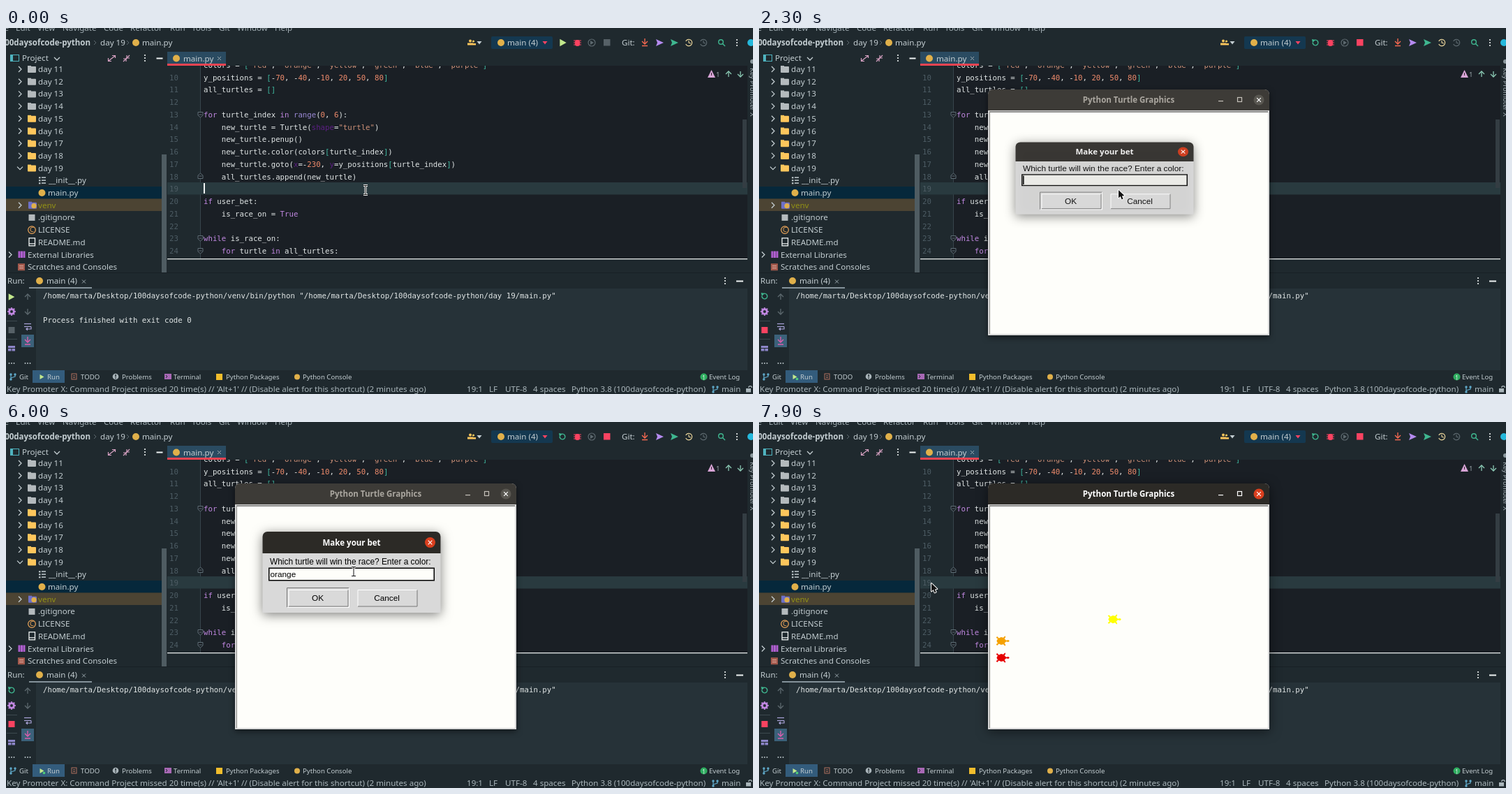
An HTML page with a canvas for the animation above (8 s loop, 1070 by 524 pixels).

```html
<!DOCTYPE html>
<html lang="en">
<head>
<meta charset="utf-8">
<title>Turtle race</title>
<style>
html, body { margin: 0; width: 100%; height: 100%; overflow: hidden; background: #1f292e; }
canvas { display: block; }
</style>
</head>
<body>
<canvas id="stage" width="1070" height="524"></canvas>
<script>
const ctx = document.getElementById('stage').getContext('2d');
const LOOP = 8000, STEP = 100;
const UI = '11.6px "Noto Sans", sans-serif', SMALL = '9.6px "Noto Sans", sans-serif';
const BOLD = 'bold 11.5px "Noto Sans", sans-serif', TK = '11.8px "Liberation Sans", sans-serif';
const MONO = '10.71px "DejaVu Sans Mono", monospace';
const FG = '#c3cdd1', WHITE = '#eef2f2', GREY = '#5d696f', YELLOW = '#fdc65c', TEAL = '#3fb68f',
  RED = '#fa4361', PURPLE = '#c087e0', PANEL = '#1f292e', PYTHON = '#e0b04a';

// Drawing helpers
function text(s, x, y, color = FG, font = UI, align = 'left') {
  ctx.font = font; ctx.fillStyle = color; ctx.textAlign = align;
  ctx.fillText(s, x, y + (font === SMALL ? 3.5 : 4));
}
function rect(x, y, w, h, color) { ctx.fillStyle = color; ctx.fillRect(x, y, w, h); }
function box(x, y, w, h, color, lw = 1) { ctx.strokeStyle = color; ctx.lineWidth = lw; ctx.strokeRect(x, y, w, h); }
function trace(p) {
  ctx.beginPath();
  for (let i = 0; i < p.length; i += 2) ctx.lineTo(p[i], p[i + 1]);
}
function line(color, lw, ...p) { trace(p); ctx.strokeStyle = color; ctx.lineWidth = lw; ctx.stroke(); }
function poly(color, ...p) { trace(p); ctx.fillStyle = color; ctx.fill(); }
function dot(x, y, r, color) { ctx.beginPath(); ctx.arc(x, y, r, 0, 7); ctx.fillStyle = color; ctx.fill(); }
function ring(x, y, r, color, lw = 1.2, from = 0, to = 2 * Math.PI) {
  ctx.beginPath(); ctx.arc(x, y, r, from, to); ctx.strokeStyle = color; ctx.lineWidth = lw; ctx.stroke();
}
function rounded(x, y, w, h, r, color) { ctx.beginPath(); ctx.roundRect(x, y, w, h, r); ctx.fillStyle = color; ctx.fill(); }
function layer(draw) { ctx.save(); draw(); ctx.restore(); }

// Icons
const python = (x, y) => dot(x, y, 5, PYTHON);
const play = (x, y, s = 4.7) => poly('#c3e88d', x - s, y - s - .5, x + s, y, x - s, y + s + .5);
const cross = (x, y, s, color, lw = 1) => { line(color, lw, x - s, y - s, x + s, y + s); line(color, lw, x - s, y + s, x + s, y - s); };
const chevron = (x, y, down) => down
  ? line(FG, 1.3, x - 4, y - 2, x, y + 2, x + 4, y - 2) : line(FG, 1.3, x - 2, y - 4, x + 2, y, x - 2, y + 4);
const kebab = (x, y) => [-4, 0, 4].forEach(d => dot(x, y + d, 1.1, WHITE));
const dots = (x, y) => [-3.5, 0, 3.5].forEach(d => dot(x + d, y, .9, FG));
const triangle = (x, y, color) => poly(color, x - 3.5, y - 2, x + 3.5, y - 2, x, y + 2.5);
function folder(x, y, color) { rect(x, y - 5, 5, 3, color); rounded(x, y - 4, 12, 9, 1, color); }
function rerun(x, y) { ring(x, y, 3.8, TEAL, 1.5, -1.9, 3.2); poly(TEAL, x - 5, y - 5, x, y - 4, x - 4, y); }
function arrow(x, y, dir, color) {
  line(color, 1.3, x, y + 4, x, y - 4);
  line(color, 1.3, x - 4, y, x, y + 4 * dir, x + 4, y);
}
function branch(x, y, color) {
  line(color, 1.2, x - 3, y - 3, x - 3, y + 4);
  line(color, 1.2, x + 3, y - 2, x + 3, y, x - 3, y + 2);
  dot(x - 3, y - 3, 1.7, color); dot(x + 3, y - 3, 1.7, color); dot(x - 3, y + 4, 1.7, color);
}
function clock(x, y, color) { ring(x, y, 4.7, color, 1.2, -2.7, 2.7); line(color, 1.1, x, y - 3, x, y, x + 3, y + 1); }
const sendArrow = (x, y, color) => poly(color, x - 5, y - 5, x + 6, y, x - 5, y + 5, x - 3, y);

function topBars(running) {
  const menu = { Edit: 14, View: 45, Navigate: 81, Code: 140, Refactor: 178, Run: 235, Tools: 266, Git: 305, Window: 331, Help: 385 };
  text('File', 4, 0, '#a3afb5', UI, 'right');
  for (const name in menu) text(name, menu[name], 0, '#a3afb5');
  text('100daysofcode-python', 121, 21, FG, BOLD, 'right');
  line(GREY, 1, 126, 18, 129, 21, 126, 24);
  text('day 19', 135, 21);
  line(GREY, 1, 173, 18, 176, 21, 173, 24);
  python(186, 21); text('main.py', 195, 21);

  dot(665, 18.5, 2, YELLOW); rect(661, 21.5, 8, 3, YELLOW); dot(669.5, 19, 1.6, YELLOW); rect(669, 22, 4, 2.5, YELLOW);
  triangle(678, 21, FG);
  rounded(695, 12, 88, 18, 2, '#143850');
  python(709, 21); text('main (4)', 718, 21); triangle(772, 21, RED);
  running ? rerun(797, 21) : play(798, 21);
  rounded(815, 17, 7, 9, 3, RED);
  [18, 21, 24].forEach(y => line(RED, 1, 813, y, 824, y));
  ring(839, 21, 5, GREY); poly(GREY, 837, 18, 842, 21, 837, 24);
  rect(856, 16, 9.5, 9.5, running ? RED : '#566167');
  text('Git:', 882, 21);
  arrow(915, 19, 1, '#ff6b52'); line('#ff6b52', 1.4, 911, 25.5, 919, 25.5);
  sendArrow(936, 21, '#b58af0'); sendArrow(957, 21, TEAL);
  clock(978, 21, '#e8d39a'); clock(999, 21, GREY);
  ring(1024, 20, 3.3, TEAL, 1.4); line(TEAL, 1.5, 1026, 22, 1030, 26);
  kebab(1047, 21); dot(1067, 21, 5, '#25b8dc');
}

function projectTree() {
  box(6.5, 38.5, 12, 9, '#4fb3bf'); rect(6, 38, 4, 10, '#4fb3bf');
  text('Project', 23, 43); chevron(73, 44, true);
  const pink = '#d9a3c4';
  line(pink, 1.2, 147, 47, 156, 40); line(pink, 1.2, 152, 39.5, 156.5, 39.5, 156.5, 43); line(pink, 1.2, 146.5, 43, 146.5, 47.5, 151, 47.5);
  line(pink, 1.2, 168, 48, 177, 39); line(pink, 1.2, 173, 39, 173, 43, 177, 43); line(pink, 1.2, 168, 44, 172, 44, 172, 48);
  kebab(199, 43); rect(215.5, 42.5, 9, 2, WHITE);

  const row = i => 59 + 17.7 * i;
  layer(() => {
    ctx.beginPath(); ctx.rect(0, 54, 231, 296); ctx.clip();
    rect(0, 227, 230, 17.5, '#06283b'); rect(0, 244.5, 230, 17.5, '#4c4433');
    for (let i = 0; i < 9; i++) {
      chevron(20, row(i), i === 8); folder(31, row(i), i < 4 ? '#b4babd' : YELLOW);
      text('day ' + (11 + i), 46, row(i));
    }
    [-4, 0, 4].forEach(d => { rect(47, row(9) + d - 1, 2.5, 2, FG); rect(51, row(9) + d - 1, 6, 1.5, FG); });
    text('__init__.py', 61, row(9));
    python(51.5, row(10)); text('main.py', 60, row(10));
    chevron(20, row(11)); folder(32, row(11), '#6d70c8'); dot(40, row(11) + 1, 3.6, PYTHON);
    text('venv', 46, row(11), '#929116');
    rect(32.5, row(12) - 4.5, 9, 9, '#b4babd'); text('.gitignore', 46, row(12));
    ring(37, row(13), 5.3, '#f0a85a'); text('C', 37, row(13) - .3, '#f0a85a', SMALL, 'center'); text('LICENSE', 46, row(13));
    box(33, row(14) - 6, 8.5, 11, WHITE, 1.3); line(WHITE, 1.2, 33, row(14) + 2, 41, row(14) + 2); text('README.md', 46, row(14));
    chevron(6, row(15));
    [17.5, 21, 24.5].forEach(x => rect(x, row(15) - 5, 3, 9.5, '#b05fd0'));
    text('External Libraries', 31, row(15));
    rect(17, row(16) - 5, 10, 10, '#a3594c'); [-2, 1].forEach(d => rect(19, row(16) + d, 6, 1, '#e3b5a8'));
    text('Scratches and Consoles', 31, row(16));
  });
  rect(223, 181, 7, 169, '#4f5c62');
}

const code = [
  'colors = ["red", "orange", "yellow", "green", "blue", "purple"]',
  'y_positions = [-70, -40, -10, 20, 50, 80]',
  'all_turtles = []',
  '',
  'for turtle_index in range(0, 6):',
  '    new_turtle = Turtle(shape="turtle")',
  '    new_turtle.penup()',
  '    new_turtle.color(colors[turtle_index])',
  '    new_turtle.goto(x=-230, y=y_positions[turtle_index])',
  '    all_turtles.append(new_turtle)',
  '',
  'if user_bet:',
  '    is_race_on = True',
  '',
  'while is_race_on:',
  '    for turtle in all_turtles:'
];
function tokenColor(token, next) {
  if (token[0] === '"') return '#ce9178';
  if (/^(for|in|if|while|True)$/.test(token)) return PURPLE;
  if (/^\d/.test(token)) return '#f08c6c';
  if (token === 'range') return '#9c8ad6';
  if (/[\[\]]/.test(token)) return '#3fb8a0';
  return /^\w/.test(token) && next === '=' ? '#5c1f85' : '#e1e6e6';
}
function editor(caret) {
  rect(231, 34, 84, 20, '#2a4b61'); rect(231, 51, 84, 3, '#ee4452');
  python(244, 43.5); text('main.py', 254, 43.5); cross(305.5, 43.5, 2.5, '#9aa7ad');
  rect(278, 54, 784, 276, '#1a1f25');
  rect(278, 54, 1, 276, '#38454c');
  rect(231, 221, 831, 17.5, '#293a3f');
  layer(() => {
    ctx.beginPath(); ctx.rect(231, 54, 831, 276); ctx.clip();
    code.forEach((source, i) => {
      const y = 52.8 + 17.75 * i;
      if (i) text(9 + i, 247, y, '#4d5c64', MONO, 'right');
      for (const m of source.matchAll(/"[^"]*"|\w+|\S/g))
        text(m[0], 283 + m.index * 6.447, y, tokenColor(m[0], source[m.index + m[0].length]), MONO);
    });
    [124, 212, 301, 319].forEach((y, i) => {
      const d = i === 1 ? -1 : 1;
      trace([275, y - 3.5 * d, 282, y - 3.5 * d, 282, y + d, 278.5, y + 4 * d, 275, y + d]);
      ctx.closePath(); ctx.fillStyle = '#1a1f25'; ctx.fill();
      ctx.strokeStyle = '#5f6e76'; ctx.lineWidth = 1; ctx.stroke();
      line('#5f6e76', 1, 276.5, y, 280.5, y);
    });
  });
  rect(1055, 131, 6, 98, '#343d43');
  rect(231, 330, 831, 1.3, '#e4e8e8');
  if (caret) rect(283, 222, 2, 15, WHITE);
  poly('#d8a4d6', 1010.5, 60, 1016, 71, 1005, 71); rect(1010, 64, 1, 4, '#33252f');
  text('1', 1017, 66, '#9aa7ad', SMALL);
  arrow(1035, 66, -1, '#8ccbb5'); arrow(1052, 66, 1, '#8ccbb5');
  dot(1069, 48, 3, '#8a979d');
  layer(() => { ctx.translate(1066, 57); ctx.rotate(Math.PI / 2); text('Key Promoter X', 0, -3.5, '#a3afb5', SMALL); });
}

function runPanel(running) {
  rect(0, 350, 1070, 1, '#182025');
  text('Run:', 2, 362); python(48, 362); text('main (4)', 58, 362); cross(111.5, 363, 2.5, '#9aa7ad');
  rect(33, 371, 90, 2, '#84929a');
  kebab(1030, 362); rect(1046, 361.5, 10, 2, WHITE);
  rect(43, 373, 1019, 117, '#263238');
  running ? rerun(8, 384) : play(8, 385, 4.3);
  ring(8, 406, 3.4, PURPLE, 2.8);
  for (let a = 0; a < 8; a++) dot(8 + 5 * Math.cos(a * Math.PI / 4), 406 + 5 * Math.sin(a * Math.PI / 4), 1.1, PURPLE);
  [419, 445].forEach(y => rect(1, y, 15, 1, '#3d4a50'));
  rect(3.5, 428, 9, 9, running ? RED : '#566167');
  rect(3, 455, 10, 3, '#8d86c9'); rect(3, 459, 4.5, 3.5, '#8d86c9'); rect(8.5, 459, 4.5, 3.5, '#8d86c9');
  dots(8, 480); dots(31, 480);
  arrow(31, 385, -1, GREY); arrow(31, 406, 1, GREY);
  [423.5, 427.5].forEach(y => line('#a9a3d8', 1.2, 26, y, 36, y));
  line('#a9a3d8', 1.2, 36, 427.5, 36, 431, 30, 431); poly('#a9a3d8', 28, 431, 31, 428.5, 31, 433.5);
  rect(22, 439, 18, 18, '#3b617a'); arrow(31, 446, 1, '#e45fb0'); line('#e45fb0', 1.4, 27, 453, 35, 453);

  const home = '/home/marta/Desktop/100daysofcode-python';
  text(`${home}/venv/bin/python "${home}/day 19/main.py"`, 53, 382.5, '#e1e6e6', MONO);
  if (!running) text('Process finished with exit code 0', 53, 418, '#e1e6e6', MONO);
}

function bottomBars(running) {
  rect(38, 490, 46, 18, '#335c7c');
  branch(10, 499, '#5fa8c8'); play(51.5, 499.5, 3);
  if (running) dot(54.5, 502.5, 1.8, '#4fd07a');
  box(94, 495, 7, 8, '#b0705f'); line('#b0705f', 1, 96, 498, 99, 498); line('#b0705f', 1, 96, 500.5, 99, 500.5);
  dot(157, 499, 4.3, '#a9b4b9'); rect(156.3, 496, 1.5, 3.5, PANEL); rect(156.3, 500.5, 1.5, 1.5, PANEL);
  rect(227, 495, 10, 8, '#a868b5'); line(PANEL, 1, 229, 497, 231, 499, 229, 501);
  rect(301, 495, 9, 9, '#f2bd2c');
  dot(417, 499.5, 4, PYTHON);
  const tabs = { Git: 19, Run: 59, TODO: 107, Problems: 166, Terminal: 240, 'Python Packages': 315, 'Python Console': 425, 'Event Log': 1007 };
  for (const name in tabs) text(name, tabs[name], 499.5, FG, SMALL);
  dot(999.5, 499.5, 5, '#2fae60'); text('1', 999.5, 499.5, WHITE, '8px "Noto Sans", sans-serif', 'center');

  text("Key Promoter X: Command Project missed 20 time(s) // 'Alt+1' // (Disable alert for this shortcut) (2 minutes ago)", 1, 517, '#aab6bb');
  const status = { '19:1': 660, LF: 692, 'UTF-8': 715, '4 spaces': 755, 'Python 3.8 (100daysofcode-python)': 810, main: 1025 };
  for (const name in status) text(name, status[name], 517, '#aab6bb');
  branch(1016, 517, '#5fa8c8');
  rect(1060, 516, 7, 5.5, '#aab6bb'); ring(1066, 515, 2.3, '#aab6bb', 1.2, Math.PI, 0);
}

// Desktop windows
function frame(x, y, w, h, bar, title, focused) {
  layer(() => {
    ctx.shadowColor = 'rgba(0,0,0,.5)'; ctx.shadowBlur = focused ? 16 : 8; ctx.shadowOffsetY = 3;
    rounded(x, y, w, h, [7, 7, 0, 0], '#d9d9d9');
  });
  rounded(x, y, w, bar, [7, 7, 0, 0], focused ? '#2c2a26' : '#3d3b37');
  const mid = y + bar / 2;
  text(title, x + w / 2, mid, focused ? '#ffffff' : '#aaa69f', BOLD, 'center');
  dot(x + w - 15, mid, 7.5, focused ? '#da3f1e' : '#595751');
  cross(x + w - 15, mid, 2.8, '#fff', 1.2);
}
function turtleWindow(x, y, focused) {
  frame(x, y, 403, 352, 30, 'Python Turtle Graphics', focused);
  const color = focused ? '#fff' : '#c5c1ba';
  rect(x + 330, y + 16, 7, 1.2, color); box(x + 357.5, y + 11.5, 6, 6, color, 1.2);
  rect(x + 2, y + 31, 399, 319, '#8f8f8d'); rect(x + 3, y + 33, 398, 317, '#fefefa');
}

function bevel(x, y, w, h, light, dark) {
  line(light, 1, x, y + h, x, y, x + w, y);
  line(dark, 1, x + w, y, x + w, y + h, x, y + h);
}
function button(x, label, hover, pressed) {
  rect(x, 240, 85, 24, hover ? '#ececec' : '#d9d9d9');
  bevel(x + .5, 240.5, 85, 23.5, pressed ? '#777' : '#fff', pressed ? '#fff' : '#777');
  text(label, x + 42 + pressed, 252 + pressed, '#000', TK, 'center');
}
function dialog(t, typed, caret) {
  const squash = t < 2500 ? .89 : t >= 7300 ? .5 : 1;
  layer(() => {
    ctx.translate(0, 215.5); ctx.scale(1, squash); ctx.translate(0, -215.5);
    ctx.globalAlpha = squash < 1 ? .92 : 1;
    frame(367.5, 157, 255, 116, 31, 'Make your bet', true);
    text('Which turtle will win the race? Enter a color:', 378, 200, '#000', '11.9px "Liberation Sans", sans-serif');
    rect(376, 208.5, 238, 19, '#000'); rect(377.5, 210, 235, 16, '#fefefa');
    text(typed, 378.5, 218, '#000', TK);
    if (caret) {
      ctx.font = TK;
      rect(378 + ctx.measureText(typed).width, 211, 1.6, 14, '#000');
    }
    bevel(402.5, 237.5, 89, 28, '#777', '#fff');
    button(404.5, 'OK', t >= 6700, +(t >= 7100 && t < 7300));
    button(503.5, 'Cancel', false, 0);
  });
}

const halfTurtle = [[16, 0], [14, 2], [10, 1], [7, 4], [9, 7], [8, 9], [5, 6], [1, 7], [-3, 5], [-6, 8], [-8, 6], [-5, 4], [-7, 0]];
const outline = halfTurtle.concat(halfTurtle.slice(1, -1).reverse().map(([x, y]) => [x, -y]));
function turtles(t) {
  ['red', 'orange', 'yellow'].forEach((color, i) => {
    const p = Math.min(1, (t - 7410) / 230 - i);
    if (p < 0) return;
    const x = 530 - 184 * p, y = 281.5 + (56 - 24 * i) * p;
    poly(color === 'red' ? '#e60000' : color === 'orange' ? '#f5a100' : '#ffff00',
      ...outline.flatMap(([dx, dy]) => [x + .8 * dx, y + .8 * dy]));
  });
}

// Pointer: time, x, y, shape
const pointerStops = [[0, 515, 232, 'beam'], [2200, 515, 232], [3400, 509, 225], [3500, 502, 216], [3800, 498, 214, 'beam'],
  [6400, 450, 238], [6500, 406, 256], [6700, 433, 262], [6900, 432.5, 261]];
function pointer(t) {
  let [, x, y, shape] = pointerStops.findLast(s => s[0] <= t);
  if (t >= 7300) {
    const u = (t - 7200) / 700, ease = u * u * (3 - 2 * u);
    x += (247 - x) * ease; y += (231 - y) * ease;
  }
  if (shape === 'beam') {
    for (const [color, lw] of [['#fff', 3], ['#111', 1]]) {
      line(color, lw, x, y - 6, x, y + 6);
      line(color, lw, x - 3, y - 6.5, x + 3, y - 6.5);
      line(color, lw, x - 3, y + 6.5, x + 3, y + 6.5);
    }
  } else {
    trace([x, y, x, y + 11.5, x + 2.7, y + 9, x + 4.6, y + 13.4, x + 6.6, y + 12.5, x + 4.8, y + 8.4, x + 8.3, y + 8]);
    ctx.closePath(); ctx.lineJoin = 'round';
    ctx.strokeStyle = '#fff'; ctx.lineWidth = 2; ctx.stroke();
    ctx.fillStyle = '#111'; ctx.fill();
    ctx.lineJoin = 'miter';
  }
}

const within = (t, ...spans) => spans.some(([a, b]) => t >= a && t < b);

function draw(t) {
  const running = t >= 1900;
  rect(0, 0, 1070, 524, PANEL);
  topBars(running);
  projectTree();
  editor(within(t, [0, 400], [800, 1400]));
  runPanel(running);
  bottomBars(running);
  if (within(t, [2200, 2300])) layer(() => {
    ctx.translate(247, 206); ctx.scale(.978, .978); ctx.globalAlpha = .975;
    turtleWindow(-201.5, -176, true);
  });
  if (t >= 2300) {
    turtleWindow(328, 88, t >= 7300);
    turtles(t);
  }
  if (within(t, [2300, 7400])) {
    const count = t < 5000 ? 0 : t < 5600 ? Math.min(5, (t - 4900) / 100) : 6;
    const hidden = within(t, [2900, 3200], [3800, 4100], [4700, 5000], [6000, 6900]);
    dialog(t, 'orange'.slice(0, count), !hidden);
  }
  pointer(t);
}

function tick() {
  draw(Math.floor(performance.now() % LOOP / STEP) * STEP);
  requestAnimationFrame(tick);
}
tick();
</script>
</body>
</html>
```
